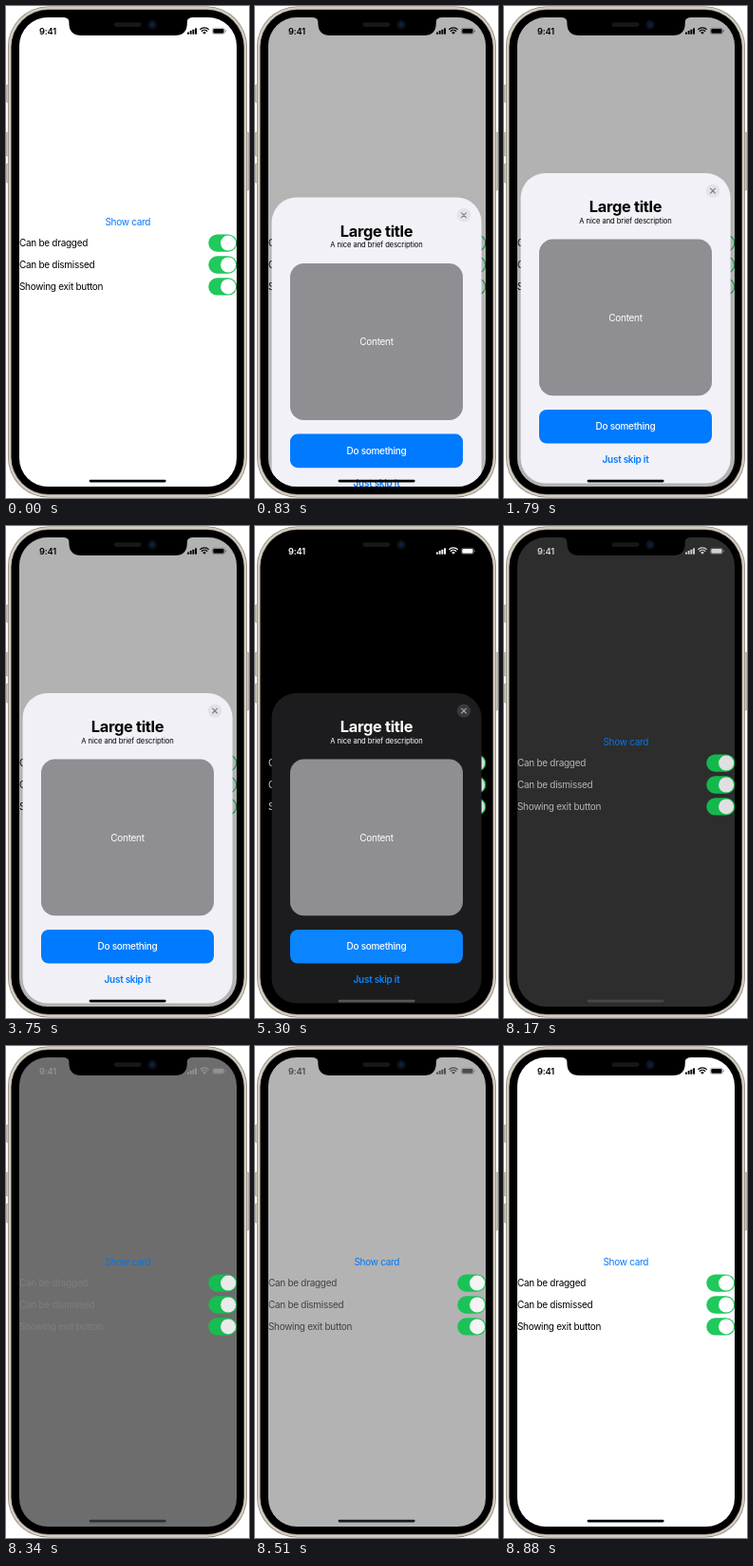
An HTML page for the animation above (8.92 s loop, 256x518 px).

```html
<!DOCTYPE html>
<html lang="en">
<head>
<meta charset="utf-8">
<title>Card sheet</title>
<style>
  html, body { margin: 0; width: 100%; height: 100%; overflow: hidden; background: #fff; }
  svg { display: block; width: 256px; height: 518px; }
  text { font: 10px Inter, "Liberation Sans", sans-serif; letter-spacing: -.28px; fill: var(--ink); }
  .mid { text-anchor: middle; }
  .blue { fill: var(--blue); }
  .title { fill: var(--title); }
  .on { fill: #fff; }
</style>
</head>
<body>
<svg id="stage" viewBox="0 0 256 518">
  <defs>
    <clipPath id="glass"><rect x="14" y="12" width="229" height="494" rx="30"/></clipPath>
    <g id="toggle">
      <rect x="213.3" y="-9.2" width="30" height="18.4" rx="9.2" fill="var(--green)"/>
      <circle cx="234.1" r="8" fill="var(--knob)"/>
    </g>
  </defs>

  <g fill="#cdc6bb" stroke="#6b655c" stroke-width=".4">
    <rect x=".4" y="83" width="3" height="18.5" rx="1"/>
    <rect x=".4" y="133" width="3" height="25" rx="1"/>
    <rect x=".4" y="166" width="3" height="20" rx="1"/>
    <rect x="252.6" y="133" width="3" height="61" rx="1"/>
  </g>
  <rect x="2" y=".5" width="252" height="517" rx="42.5" fill="#7d766c"/>
  <rect x="2.6" y="1.1" width="250.8" height="515.8" rx="42" fill="#d3cbbf"/>
  <rect x="5.2" y="3.6" width="245.8" height="510.8" rx="39.5" fill="#7a736a"/>
  <rect x="5.7" y="4.1" width="244.8" height="509.8" rx="39" fill="#000"/>

  <g clip-path="url(#glass)">
    <rect x="13" y="11" width="232" height="496" fill="var(--page)"/>
    <text class="mid" x="128.3" y="231.2" style="fill:var(--link)">Show card</text>
    <g id="rows"></g>
    <rect id="dim" x="13" y="11" width="232" height="496" fill="#000"/>

    <g id="card">
      <rect x="17.6" y="176" width="221" height="326.4" rx="26" fill="var(--card)"/>
      <circle cx="220" cy="194.6" r="7.2" fill="var(--exit)"/>
      <path d="M217.6 192.2l4.8 4.8m0-4.8l-4.8 4.8" stroke="var(--cross)" stroke-width="1.1" stroke-linecap="round"/>
      <text class="mid title" x="128" y="217.4" style="font-size:16.4px;font-weight:700;letter-spacing:-.3px">Large title</text>
      <text class="mid title" x="128" y="228.6" style="font-size:7.6px;letter-spacing:-.06px">A nice and brief description</text>
      <rect x="37" y="245.5" width="182" height="164.8" rx="14.5" fill="#8e8e93"/>
      <text class="mid on" x="128" y="331.5">Content</text>
      <rect x="37" y="425" width="182" height="35.6" rx="8" fill="var(--blue)"/>
      <text class="mid on" x="128" y="446.4" style="font-weight:500">Do something</text>
      <text class="mid blue" x="128" y="480.6" style="font-weight:600">Just skip it</text>
    </g>

    <g fill="var(--bar)">
      <text x="35" y="29.8" style="font-size:9.3px;font-weight:600;letter-spacing:-.15px;fill:var(--bar)">9:41</text>
      <g id="signal"></g>
      <path d="M209 29.8l-1.8-1.9a2.6 2.6 0 0 1 3.6 0z"/>
      <g fill="none" stroke="var(--bar)" stroke-width="1.3">
        <path d="M205.9 26.7a4.4 4.4 0 0 1 6.2 0M204.3 24.9a6.7 6.7 0 0 1 9.4 0"/>
      </g>
      <rect x="217.4" y="23.2" width="13" height="6.4" rx="2" fill="none" stroke="var(--bar)" stroke-opacity=".45" stroke-width=".6"/>
      <rect x="218.3" y="24" width="11.2" height="4.8" rx="1.3"/>
      <rect x="231.1" y="25.3" width=".8" height="2.2" rx=".4" opacity=".5"/>
    </g>
    <rect x="87.6" y="498.7" width="81" height="2.8" rx="1.4" fill="var(--home)"/>
  </g>

  <path d="M60 10V12q6 0 6.4 4.5V18q0 13 13 13h98.4q13 0 13-13v-1.5q.4-4.5 6.4-4.5V10z" fill="#000"/>
  <rect x="113.5" y="17.3" width="29" height="4.6" rx="2.3" fill="#171719"/>
  <circle cx="154" cy="19.7" r="4.7" fill="#0b131f"/>
  <circle cx="154" cy="19.7" r="2" fill="#10223f"/>
</svg>
<script>
const LOOP = 8920;
const stage = document.getElementById("stage");
const card = document.getElementById("card");
const dim = document.getElementById("dim");

// Each role: light colour, dark colour
const palette = {
  page: ["ffffff", "000000"],
  ink: ["000000", "dcdcdc"],
  title: ["000000", "ffffff"],
  bar: ["000000", "ffffff"],
  link: ["007aff", "0872dc"],
  blue: ["007aff", "0a84ff"],
  green: ["1fc95b", "10b44a"],
  knob: ["ffffff", "dadada"],
  card: ["f2f1f7", "1c1c1e"],
  exit: ["e3e3e8", "39393d"],
  cross: ["7c7c81", "a4a4aa"],
  home: ["000000", "565656"]
};

document.getElementById("rows").innerHTML =
  ["Can be dragged", "Can be dismissed", "Showing exit button"].map((label, i) => {
    const y = 249.6 + i * 22.9;
    return `<text x="13.9" y="${y + 3.8}">${label}</text><use href="#toggle" y="${y}"/>`;
  }).join("");

document.getElementById("signal").innerHTML = [2.4, 3.7, 5.1, 6.6].map((h, i) =>
  `<rect x="${191 + i * 2.7}" y="${29.8 - h}" width="1.9" height="${h}" rx=".5"/>`).join("");

const progress = (t, start, length) => Math.min(1, Math.max(0, (t - start) / length));
const smooth = p => p * p * (3 - 2 * p);
const settle = p => 1 - (1 - p) ** 4;
const lerp = (a, b, p) => a + (b - a) * p;

function mix(from, to, p) {
  const channel = i => Math.round(lerp(
    parseInt(from.slice(i, i + 2), 16), parseInt(to.slice(i, i + 2), 16), p));
  return `rgb(${[0, 2, 4].map(channel)})`;
}

function render(t) {
  const dark = smooth(progress(t, 3710, 880)) - smooth(progress(t, 7927, 916));
  for (const [role, [light, night]] of Object.entries(palette))
    stage.style.setProperty("--" + role, mix(light, night, dark));

  const shown = settle(progress(t, 450, 800));
  const leaving = progress(t, 7460, 440);
  card.setAttribute("transform", `translate(0 ${(340 * (1 - shown + leaving ** 2)).toFixed(2)})`);

  // Dark colours already include their shade, so the dim layer serves the light look
  const shade = smooth(progress(t, 450, 420)) - smooth(leaving);
  dim.setAttribute("opacity", (.3 * shade * (1 - dark)).toFixed(3));
}

function tick() {
  render(performance.now() % LOOP);
  requestAnimationFrame(tick);
}
tick();
</script>
</body>
</html>
```
